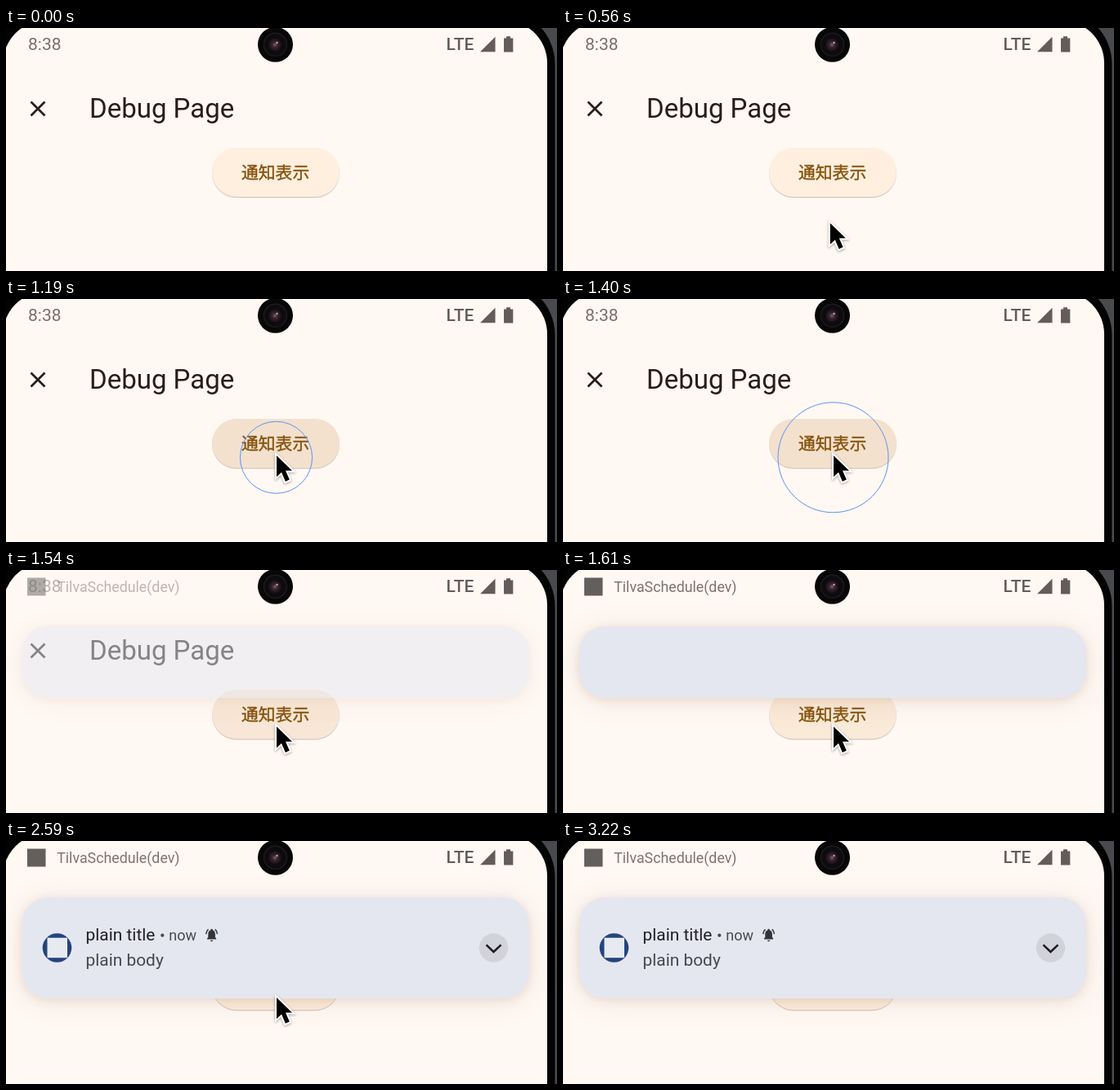
These frames come from a looping animation (674 by 298 pixels, 4.13 s). An HTML page:

```html
<!DOCTYPE html>
<html lang="ja">
<head>
<meta charset="utf-8">
<title>Notification demo</title>
<style>
  html, body { margin: 0; width: 100%; height: 100%; overflow: hidden; background: #000; }
  svg { display: block; width: 100vw; height: 100vh; font-family: Roboto, sans-serif; }
  .ja { font: 500 20.8px "Noto Sans CJK JP", "Noto Sans CJK", sans-serif; }
  #card { filter: drop-shadow(0 2px 5px rgba(130, 75, 45, .1)) drop-shadow(0 4px 16px rgba(130, 75, 45, .12)); }
  #cursor { filter: drop-shadow(0 1.5px 1.5px rgba(0, 0, 0, .35)); }
</style>
</head>
<body>
<svg viewBox="0 0 674 298">
  <defs>
    <clipPath id="buttonClip"><rect x="252" y="147" width="156" height="60" rx="30"/></clipPath>
    <radialGradient id="lens">
      <stop offset="0" stop-color="#80606f"/>
      <stop offset=".4" stop-color="#3a2430"/>
      <stop offset="1" stop-color="#151013"/>
    </radialGradient>
  </defs>

  <!-- phone -->
  <rect width="674" height="298" fill="#484a4e"/>
  <rect x="-30" y="-22" width="701.500" height="400" rx="66" fill="#030304"/>
  <rect x="-3.500" y="-9" width="665.500" height="400" rx="52" fill="#fff8f3"/>

  <!-- app page -->
  <path d="M30.5 90.500l17 17m0-17l-17 17" stroke="#271d19" stroke-width="2.700"/>
  <text x="102" y="110" font-size="33" fill="#271d19">Debug Page</text>
  <rect x="252" y="148.200" width="156" height="60" rx="30" fill="#d5c9c2"/>
  <rect x="252" y="147" width="156" height="60" rx="30" fill="#feefdf"/>
  <circle id="ripple" cx="331" cy="194" fill="#875028" clip-path="url(#buttonClip)"/>
  <text class="ja" x="288" y="185.300" fill="#84530c" stroke="#84530c" stroke-width=".4">通知表示</text>

  <!-- status bar -->
  <text id="clock" x="27" y="27" font-size="21" fill="#77716e">8:38</text>
  <g id="appLabel">
    <rect x="26" y="9.500" width="22.500" height="22" fill="#635f5d"/>
    <text x="62.200" y="27" font-size="17.800" fill="#7b7572">TilvaSchedule(dev)</text>
  </g>
  <g fill="#625d5b">
    <text x="538.500" y="27.300" font-size="20.900" font-weight="500">LTE</text>
    <path d="M580 29.200h18.500v-18.500z"/>
    <path d="M609 12.500h3v-2.300h5v2.300h3.300v17h-11.300z"/>
  </g>
  <circle cx="329.500" cy="20.300" r="21.500" fill="#080708"/>
  <circle cx="329.500" cy="20.300" r="14" fill="#0d0b0d" stroke="#1e1a1e" stroke-width="1.500"/>
  <circle cx="329" cy="20.500" r="8" fill="url(#lens)"/>
  <circle cx="331.500" cy="18" r="1.200" fill="#c9a5b8"/>

  <!-- heads-up notification -->
  <g id="notification">
    <rect id="card" x="19.500" y="69" width="620.500" rx="32" fill="#e5e7f0"/>
    <g id="content">
      <circle cx="62.500" cy="131" r="17.800" fill="#24447c"/>
      <rect x="50.500" y="118.700" width="24.500" height="24.500" fill="#e8eaf2"/>
      <text x="97.500" y="122" font-size="20.900" fill="#211f26">plain title</text>
      <circle cx="191.300" cy="115.700" r="2.100" fill="#4b4950"/>
      <text x="199.300" y="122" font-size="18" fill="#4b4950">now</text>
      <g transform="translate(0 .6)">
        <path d="M246 120v-1.200l1.300-1.500v-4q0-3.600 3-4.400v-.9q1.300-1.500 2.600 0v.9q3 .8 3 4.400v4l1.300 1.500v1.200zM249.800 121.200h3.600q-1.800 3-3.600 0z" fill="#35333a"/>
        <path d="M244.700 113.500q.2-3.700 2.800-5.700m11 5.700q-.2-3.700-2.800-5.700" fill="none" stroke="#35333a" stroke-width="1.500"/>
      </g>
      <text x="97.500" y="152.500" font-size="20.900" fill="#49474e">plain body</text>
      <circle cx="596.500" cy="131" r="17.700" fill="#d2d2db"/>
      <path d="M587.500 127.300l9 8.700 9-8.700" fill="none" stroke="#1c1b20" stroke-width="2.500"/>
    </g>
  </g>

  <!-- pointer -->
  <circle id="ring" cx="330.500" cy="194.300" fill="none" stroke="#5b93f5" stroke-width="1"/>
  <path id="cursor" d="M0 0v26l6-5.500 4.800 11.300 5-2.200-4.800-11h8z" fill="#000" stroke="#fff" stroke-width="4" paint-order="stroke"/>
</svg>
<script>
  const LOOP = 4130, STEP = 70;
  const $ = id => document.getElementById(id);
  const progress = (t, from, to) => Math.min(1, Math.max(0, (t - from) / (to - from)));
  const easeOut = p => 1 - (1 - p) ** 3;
  const easeInOut = p => p * p * (3 - 2 * p);
  const mix = (a, b, p) => a + (b - a) * p;
  const contentParts = [...$("content").children];

  function drawPointer(t) {
    const enter = easeOut(progress(t, 420, 980));
    const leave = easeInOut(progress(t, 2940, 3220));
    const away = 1 - enter + leave;
    $("cursor").setAttribute("transform", `translate(${331 - 10 * away} ${192 + 112 * away})`);
    $("cursor").style.opacity = t >= 490 && t < 3220 ? 1 : 0;

    $("ring").setAttribute("r", mix(12, 67.5, easeOut(progress(t, 1120, 1400))));
    $("ring").style.opacity = t >= 1120 && t < 1540 ? 1 - .75 * progress(t, 1400, 1540) : 0;
  }

  function drawButton(t) {
    $("ripple").setAttribute("r", 105 * easeOut(progress(t, 1050, 1330)));
    $("ripple").style.opacity = t < 1120 ? 0 : mix(.09, .015, progress(t, 1400, 1680));
  }

  function drawNotification(t) {
    const shown = progress(t, 1470, 1610);
    const opened = progress(t, 1610, 1890);
    $("clock").style.opacity = 1 - shown;
    $("appLabel").style.opacity = shown;
    $("notification").style.opacity = shown;
    $("card").setAttribute("height", mix(88, 124, easeOut(opened)));
    for (const part of contentParts) part.style.opacity = opened;
  }

  function frame(now) {
    const t = Math.floor((now % LOOP) / STEP) * STEP;
    drawPointer(t);
    drawButton(t);
    drawNotification(t);
    requestAnimationFrame(frame);
  }
  frame(0);
</script>
</body>
</html>
```
